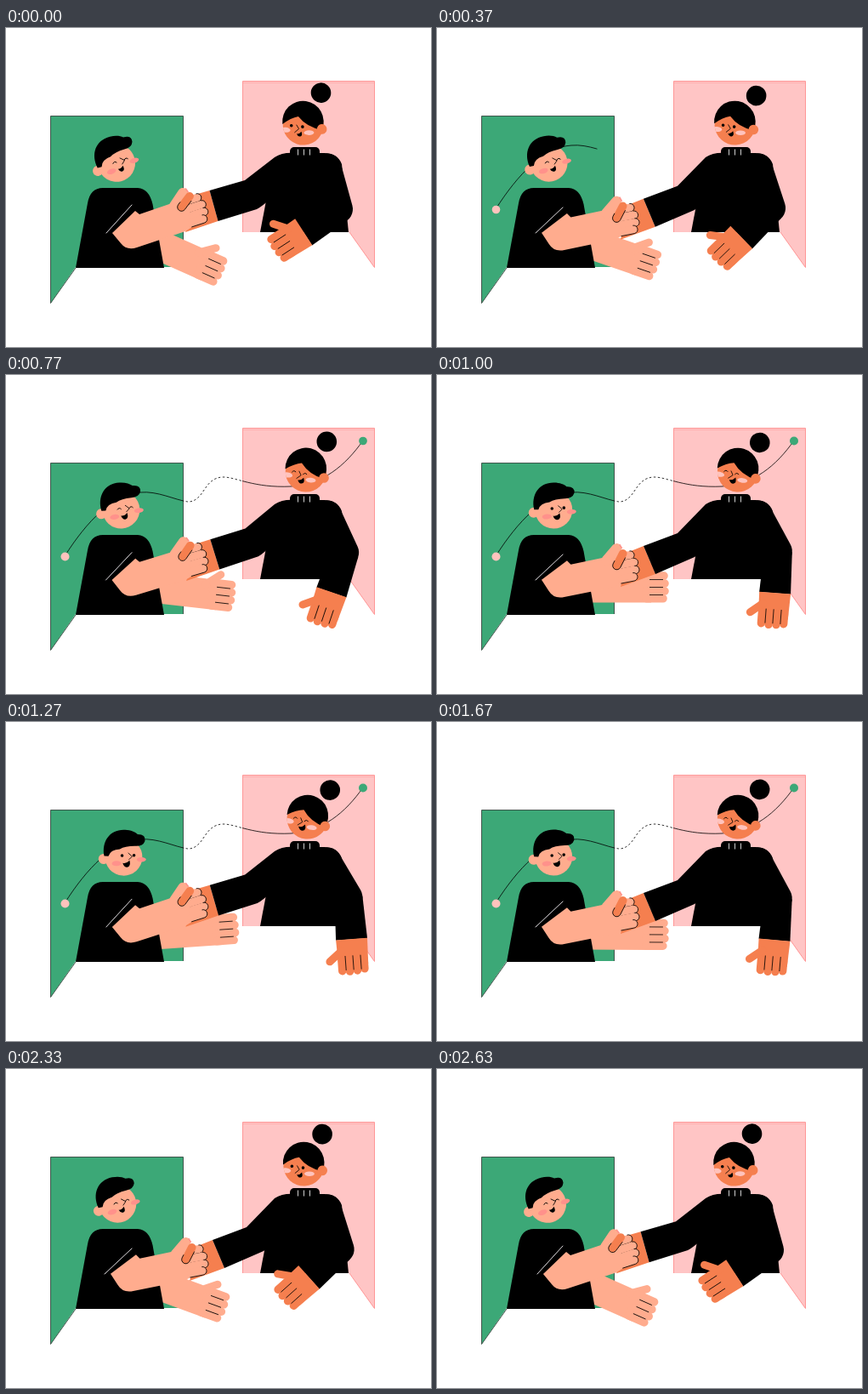
Write an HTML page with a canvas that moves like this. It is 500x375 px and loops after 2.66 s.

```html
<!DOCTYPE html>
<html lang="en">
<head>
<meta charset="utf-8">
<title>Handshake</title>
<style>
  html, body { margin: 0; width: 100%; height: 100%; overflow: hidden; background: #fff; }
  canvas { display: block; }
</style>
</head>
<body>
<canvas id="stage" width="500" height="375"></canvas>
<script>
const ctx = document.getElementById('stage').getContext('2d');
const LOOP = 2660;
const FINE = 0.8;
const GREEN = '#3ca877', PINK = '#ffc5c5', SKIN = '#ffac8e', BLUSH = '#ff918b';
const ORANGE = '#f57f4f', PALE = '#ffc3bd', INK = '#000';

const thread = 'M69 213C95 172 126 140 158 138C178 136 199 147 214 149' +
  'C234 149 232 120 256 120C270 120 292 133 335 131C372 129 399 107 420 77';
const threadShape = new Path2D(thread);
const threadRuler = document.createElementNS('http://www.w3.org/2000/svg', 'path');
threadRuler.setAttribute('d', thread);
const threadLength = threadRuler.getTotalLength();

const rad = deg => deg * Math.PI / 180;
const mix = (a, b, k) => a + (b - a) * k;
const mixPt = (a, b, k) => [mix(a[0], b[0], k), mix(a[1], b[1], k)];
const ramp = (t, start, end) => Math.min(1, Math.max(0, (t - start) / (end - start)));
const smooth = k => (1 - Math.cos(Math.PI * k)) / 2;

function fill(path, color) {
  ctx.fillStyle = color;
  ctx.fill(new Path2D(path));
}

function stroke(path, width = FINE, color = INK) {
  ctx.strokeStyle = color;
  ctx.lineWidth = width;
  ctx.stroke(path instanceof Path2D ? path : new Path2D(path));
}

function ellipse(x, y, rx, ry, color, turn = 0) {
  ctx.beginPath();
  ctx.ellipse(x, y, rx, ry, rad(turn), 0, Math.PI * 2);
  ctx.fillStyle = color;
  ctx.fill();
}

const disc = (x, y, r, color) => ellipse(x, y, r, r, color);

function bar(from, to, width, color, cap = 'round') {
  ctx.lineCap = cap;
  stroke(`M${from}L${to}`, width, color);
  ctx.lineCap = 'butt';
}

// Runs draw() in a frame rotated by deg whose origin is (x, y).
function at(x, y, deg, draw) {
  ctx.save();
  ctx.translate(x, y);
  ctx.rotate(rad(deg));
  draw();
  ctx.restore();
}

// Same, but keeps stage coordinates and turns around (x, y).
const around = (x, y, deg, draw) => at(x, y, deg, () => {
  ctx.translate(-x, -y);
  draw();
});

function drawPanels() {
  const left = 'M52.5 103.5H208.5V281H82L52.5 323.5Z';
  const right = 'M278.5 62.5H433.5V281.5L404 240H278.5Z';
  fill(left, GREEN);
  stroke('M82 282L52.5 323.5V103.5H208.5V281', 1, '#40564c');
  fill(right, PINK);
  stroke('M278.5 240V62.5H433.5V281.5L404 240', 1, '#ff9696');
  stroke('M279 64.5H433', 1, '#ffb0b0');
}

function drawThread(t) {
  const shown = smooth(ramp(t, 165, 665)) - smooth(ramp(t, 1810, 2310));
  if (shown > 0.002) {
    const endX = threadRuler.getPointAtLength(threadLength * shown).x;
    const section = (x0, x1, dash) => {
      if (endX <= x0) return;
      ctx.save();
      ctx.beginPath();
      ctx.rect(x0, 0, Math.min(x1, endX) - x0, 375);
      ctx.clip();
      ctx.setLineDash(dash);
      stroke(threadShape);
      ctx.restore();
    };
    section(0, 209, []);
    section(209, 278, [2.5, 2.5]);
    section(278, 500, []);
  }
  const pop = (start, end, out, gone) => {
    const k = ramp(t, start, end);
    return 5 * k * (1 + 0.4 * Math.sin(Math.PI * k)) * (1 - ramp(t, out, gone));
  };
  disc(69.5, 213.5, pop(170, 440, 2110, 2300), PALE);
  disc(420, 77.5, pop(610, 820, 1740, 1860), GREEN);
}

function drawEyes(a, b, open) {
  for (const [x, y] of [a, b]) {
    if (open) disc(x, y, 1.8, INK);
    else stroke(`M${x - 2.4} ${y + 1.3}Q${x} ${y - 2} ${x + 2.4} ${y + 1}`, 0.9);
  }
}

const drawMouth = (x, y, size) => at(x, y, -8, () => {
  ctx.scale(size, size);
  fill('M-4 -1Q0 0.5 4 -3Q5 4 0.5 4.2Q-3 4 -4 -1Z', INK);
});

function drawManHead(p, open) {
  around(135, 187, mix(-14, 3, p), () => at(137, 158.5, 0, () => {
    disc(-23.5, 3.5, 6, SKIN);
    disc(0, 0, 22, SKIN);
    ellipse(21, 2, 5.5, 2.8, BLUSH, -4);
    ellipse(-8, 8, 5.5, 3, BLUSH, -6);
    fill('M-23 0C-27 -17 -18 -32 0 -32C7 -32 12 -30 15 -27.5Q25 -28 24 -20' +
         'Q22 -13.5 13 -13.5Q1 -13 -5 -9Q-16 -8 -18 0Z', INK);
    drawEyes([-2, -1.5], [12, -2.5], open);
    stroke('M5 -5L10 -1L6 3');
    drawMouth(3.5, 7.5, mix(0.85, 1.05, p));
  }));
}

function drawFreeArm(p) {
  around(172, 228, mix(24, -4, p), () => {
    fill('M172 232H236L252 235V267.5H172Z', SKIN);
    bar([236, 239], [253, 225.5], 9, SKIN);
    [[267, 236], [268, 245], [268, 254], [266, 262.7]].forEach(([x, y]) =>
      bar([246, y], [x, y], 9.6, SKIN));
    for (const y of [240.5, 249.5, 258.5]) stroke(`M250 ${y}H266`);
  });
}

function drawManBody() {
  fill('M82 282L96 206Q99 188 114 188H155Q168 188.5 172.5 207L186 282Z', INK);
}

function drawClasp(u) {
  const cuffTop = mixPt([239.5, 191], [243, 201], u);
  const cuffEnd = mixPt([249.5, 227], [257, 234], u);
  const wristTop = mixPt([222, 196], [228, 207], u);
  const wristEnd = mixPt([211, 240], [216, 249], u);
  const elbowTop = mixPt([281, 179], [283, 186], u);
  const elbowEnd = mixPt([295, 213], [303, 214], u);
  const thumbBase = mixPt([206.5, 210.5], [211.5, 224], u);

  fill(`M${cuffTop}L${cuffEnd}L${wristEnd}L${wristTop}Z`, ORANGE);
  fill(`M340 147Q325 146 316 152L${elbowTop}L${cuffTop}L${cuffEnd}` +
       `L${elbowEnd}Q${elbowEnd[0] + 6} ${elbowEnd[1] - 3} 312 200L340 190Z`, INK);

  bar(mixPt([118, 241], [116, 241], u), mixPt([148, 208], [148, 211], u), 1, '#e0dce0');

  ctx.save();
  ctx.translate(-2 * u, 1.5 * u);
  around(140, 240, 7 * u, () => {
    fill('M125 241L152 215L157 219L195 206L222 196L231 226L211 239L154 258' +
         'Q142 262 135 253Z', SKIN);
    bar([198, 209], [208, 194], 12, SKIN);
    stroke('M211 188.5L214.5 193', 1.5, BLUSH);
    for (const [x, y] of [[225, 199.5], [230.5, 207.5], [233, 216], [232, 224.5]]) {
      at(x, y, -18, () => {
        bar([-14, 0], [0, 0], 9.6, SKIN);
        stroke('M-16 4.8H0A4.8 4.8 0 0 0 0 -4.8');
      });
    }
  });
  ctx.restore();

  at(thumbBase[0], thumbBase[1], mix(-53, -63, u), () => {
    bar([0, 0], [16, 0], 9.6, ORANGE);
    stroke('M4 -4.8H0A4.8 4.8 0 0 0 0 4.8H13');
  });
}

function drawWomanBody(p) {
  fill('M299 240L306 203L314 165Q318 147 335 147H374Q390 147 395 160L403 240Z', INK);
  const elbow = mixPt([391.5, 213], [403, 206], p);
  const angle = mix(147, 85.5, p);
  const reach = 49.5;
  bar([378, 164], elbow, 33, INK);

  at(elbow[0], elbow[1], angle - 90, () => {
    ctx.translate(0, reach);
    fill(`M-16.5 ${-reach}H16.5L18.5 0H-18.5Z`, INK);
    fill('M-18.5 -0.3H18.5L17.5 30H-17.5Z', ORANGE);
    bar([-13, 13], [-27.5, 24.5], 9, ORANGE);
    [[-13.5, 36.5], [-4.7, 37.5], [4.2, 37], [12.8, 35.5]].forEach(([x, y]) =>
      bar([x, 24], [x, y], 9.4, ORANGE));
    for (const x of [-9, 0, 9]) stroke(`M${x} 19V36`);
  });
}

function drawCollar() {
  ctx.beginPath();
  ctx.roundRect(334, 140, 35, 14, 5);
  ctx.fillStyle = INK;
  ctx.fill();
  for (const x of [343.5, 350.5, 357.5]) stroke(`M${x} 142.5V149.5`, 1, '#cfcfcf');
}

function drawWomanHead(t, p, open) {
  const bounce = t < 740 ? Math.sin(Math.PI * t / 740) ** 2 * 3 : 0;
  around(352, 143, mix(-4.5, 5, p), () => at(352, 112, 0, () => {
    disc(23.7 + bounce, -34.2 + bounce, 11.8, INK);
    ctx.save();
    ctx.beginPath();
    ctx.arc(0, 1.5, 24, 0, Math.PI * 2);
    ctx.clip();
    disc(0, 1.5, 25, ORANGE);
    ellipse(-21.5, 6, 6, 3, PALE, 8);
    ellipse(6, 11.5, 6, 2.8, PALE, 4);
    ctx.restore();
    fill('M-24.3 -1A24.3 24.5 0 1 1 21.5 9.5Q4 5 -5 -8.5Q-14 -7.5 -24.3 -1Z', INK);
    disc(21.5, 8.5, 5.8, ORANGE);
    drawEyes([-14, 1.5], [-1, 4], open);
    stroke('M-8 1L-5.5 6L-11 10');
    drawMouth(-5.5, 12, mix(0.75, 1, p));
  }));
}

function render(t) {
  const sway = smooth(t / (LOOP / 2));
  const shake = smooth(t / (LOOP / 8));
  ctx.fillStyle = '#fff';
  ctx.fillRect(0, 0, 500, 375);
  drawPanels();
  drawThread(t);
  drawFreeArm(sway);
  drawManBody();
  drawManHead(sway, t > 1000 && t < 2300);
  drawWomanBody(sway);
  drawClasp(shake);
  drawCollar();
  drawWomanHead(t, sway, t < 570 || t > 2300);
}

const begin = performance.now();
function tick() {
  render((performance.now() - begin) % LOOP);
  requestAnimationFrame(tick);
}
tick();
</script>
</body>
</html>
```
